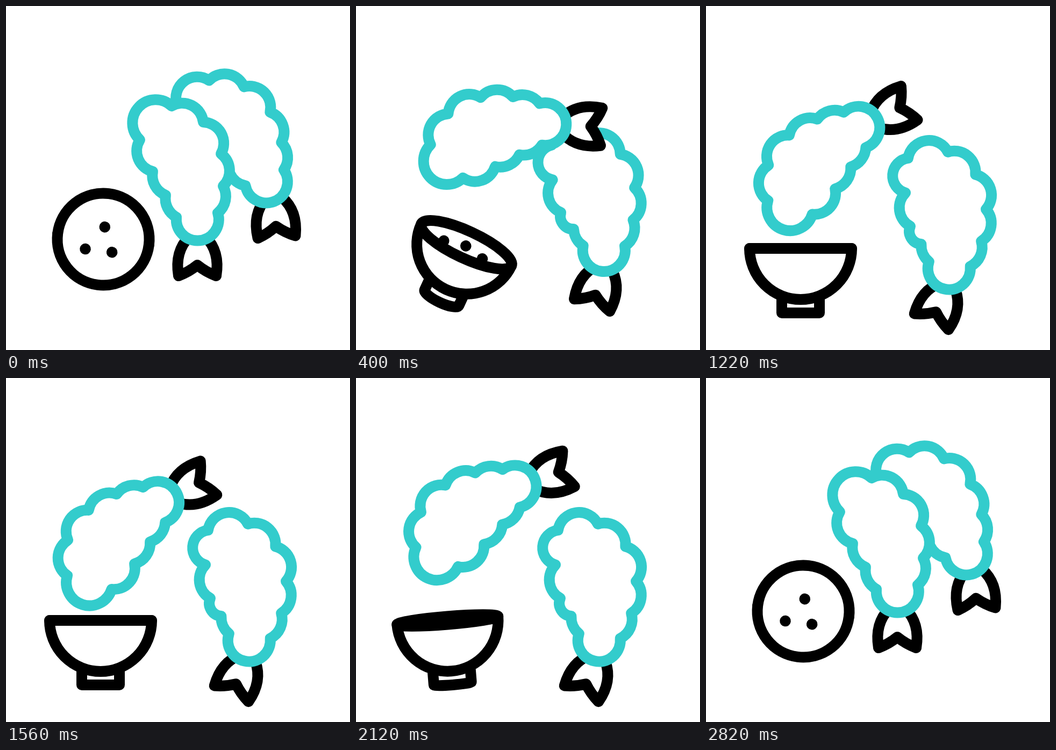
Recreate the animation shown at these times as an HTML page with a canvas. Size 640 by 640 pixels, loop 3.6 s.

```html
<!DOCTYPE html>
<html lang="en">
<head>
<meta charset="utf-8">
<title>Tempura and bowl</title>
<style>
  html, body { margin: 0; width: 100%; height: 100%; overflow: hidden; background: #fff; }
  canvas { display: block; }
</style>
</head>
<body>
<canvas id="stage" width="640" height="640"></canvas>
<script>
const ctx = document.getElementById('stage').getContext('2d');
const LOOP = 3600, TURN = 2 * Math.PI, RAD = Math.PI / 180;
const TEAL = '#33cccc', BLACK = '#000';

// Share of the span from a to b that has passed, and three curves over it
const part = (t, a, b) => Math.min(1, Math.max(0, (t - a) / (b - a)));
const hump = (t, a, b) => Math.sin(Math.PI * part(t, a, b));
const wave = (t, a, b) => hump(t, a, b) ** 2;
function ease(t, a, b) {
  const u = part(t, a, b);
  return u < .5 ? 4 * u ** 3 : 1 - 4 * (1 - u) ** 3;
}

// A shrimp's origin is the centre of its round end by the tail.
const arcs = (points) => points.map(([x, y, r = 39.5]) => `A${r} ${r} 0 0 1 ${x} ${y}`).join('');
const back = 'M-48-211' + arcs([[11, -181], [44, -122], [48, -62], [38, -12], [0, 39.5], [-39, -4]]);
const frontBody = new Path2D(back + arcs([[-59, -45], [-83, -89], [-107, -148], [-48, -211]]) + 'Z');
const rearBody = new Path2D(back + arcs([[-60, -33], [-87, -61, 24], [-109, -120], [-118, -184, 33], [-48, -211]]) + 'Z');
const tail = new Path2D('M-15 32C-33 50-40 75-35 105Q-16 98 0 85Q16 98 35 105C40 75 33 50 15 32Z');

function paint(path, color) {
  ctx.fillStyle = '#fff';
  ctx.strokeStyle = color;
  ctx.fill(path);
  ctx.stroke(path);
}

function at(x, y, deg, draw) {
  ctx.save();
  ctx.translate(x, y);
  ctx.rotate(deg * RAD);
  draw();
  ctx.restore();
}

function rearShrimp(t) {
  const p = ease(t, 0, 640) - ease(t, 2106, 2820);
  at(484 - 32 * p + 14 * p * (1 - p), 327 + 161 * p, 28.9 * p - 16.6, () => {
    at(12.6, 1.6, 12.8, () => paint(tail, BLACK));
    paint(rearBody, TEAL);
  });
}

// Flies up, dips towards the bowl while drifting left, then returns
function frontShrimp(t) {
  const p = ease(t, 0, 615) - ease(t, 1980, 2540);
  const drift = ease(t, 890, 1240), dip = hump(t, 890, 1980);
  const x = 356 - p * (27 + 37 * drift + 10 * dip) + 130 * (1 - drift) * p * (1 - p);
  const y = 397 - p * (213 - 5 * drift - 46 * dip);
  at(x, y, -p * (105 + 11 * drift), () => {
    paint(tail, BLACK);
    paint(frontBody, TEAL);
  });
}

// Tips from the view straight down to the side view and back
function bowl(t) {
  const tip = ease(t, 0, 620) - ease(t, 2030, 2420);
  const sway = wave(t, 0, 700) - wave(t, 2000, 2820);
  const s = Math.cos(tip * TURN / 4), c = Math.sin(tip * TURN / 4);
  const r = 95 - 9.5 * s;

  const foot = new Path2D();
  foot.moveTo(-35, 95 * c);
  foot.ellipse(0, 120 * c - 25 * s, 35, 35 * s, 0, TURN / 2, 0, true);
  foot.lineTo(35, 95 * c);
  const cup = new Path2D();
  cup.ellipse(0, 0, r, 95 * c, 0, 0, TURN / 2);
  cup.closePath();
  const rim = new Path2D();
  rim.ellipse(0, 0, r, r * s, 0, 0, TURN);

  at(181 - 5 * tip + 30 * sway, 434 + 17 * tip - 4 * sway, 7 * (1 - tip) + 25 * sway, () => {
    for (const path of [foot, cup, rim]) paint(path, BLACK);
    ctx.clip(rim);
    ctx.fillStyle = BLACK;
    for (const side of [-1, 0, 1]) {
      const out = Math.abs(side);
      ctx.beginPath();
      ctx.arc(side * (45 - 20 * s) - 6 * s * out, 12 - 35 * s + out * (50 * s - 5), 10.3, 0, TURN);
      ctx.fill();
    }
  });
}

const start = performance.now();
function frame() {
  const t = (performance.now() - start) % LOOP;
  ctx.fillStyle = '#fff';
  ctx.fillRect(0, 0, 640, 640);
  ctx.lineWidth = 20;
  ctx.lineJoin = 'round';
  ctx.lineCap = 'round';
  rearShrimp(t);
  frontShrimp(t);
  bowl(t);
  requestAnimationFrame(frame);
}
frame();
</script>
</body>
</html>
```
